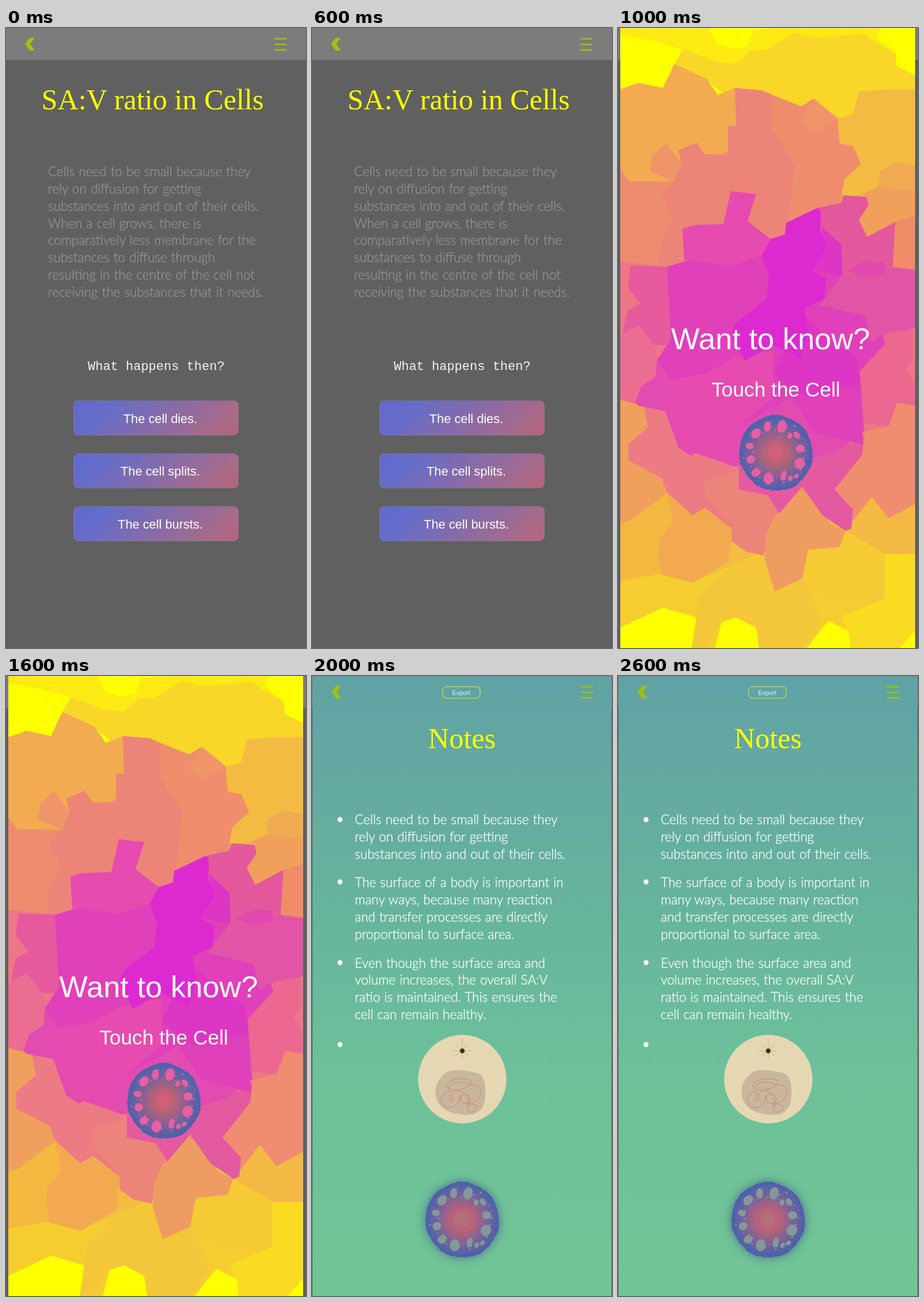
Animation of 521x1075 px, one loop 3 s. Source, as an HTML page:

```html
<!DOCTYPE html>
<html lang="en">
<head>
<meta charset="utf-8">
<title>Cells</title>
<style>
html, body { margin: 0; width: 100%; height: 100%; overflow: hidden; background: #606060; }
svg { display: block; width: 100vw; height: 100vh; }
.title { font: 50.3px "Liberation Serif", serif; fill: #ff0; text-anchor: middle; }
.body { font: 300 22.5px Lato, sans-serif; word-spacing: 1px; fill: currentColor; stroke: currentColor; stroke-width: .35; }
.mono { font: 22px "Liberation Mono", monospace; fill: #f4f4f4; }
.sans { font-family: "Liberation Sans", Arial, sans-serif; fill: #fff; text-anchor: middle; }
</style>
</head>
<body>
<svg viewBox="0 0 521 1075" preserveAspectRatio="none">
  <defs>
    <linearGradient id="btn" gradientUnits="userSpaceOnUse" x1="57" y1="-57" x2="230" y2="117">
      <stop offset="0" stop-color="#6069cc"/>
      <stop offset=".2" stop-color="#656cc9"/>
      <stop offset=".85" stop-color="#a96a88"/>
      <stop offset="1" stop-color="#b4647c"/>
    </linearGradient>
    <linearGradient id="sea" x2="0" y2="1">
      <stop offset="0" stop-color="#61a2a5"/>
      <stop offset=".3" stop-color="#65b09e"/>
      <stop offset=".65" stop-color="#6dc19a"/>
      <stop offset="1" stop-color="#72c595"/>
    </linearGradient>
    <radialGradient id="flesh" gradientUnits="userSpaceOnUse" cx="0" cy="0" r="65">
      <stop offset="0" stop-color="#cf5f6c"/>
      <stop offset=".3" stop-color="#b96277"/>
      <stop offset=".75" stop-color="#6962a0"/>
      <stop offset="1" stop-color="#4a61ae"/>
    </radialGradient>
    <filter id="glow" x="-40%" y="-40%" width="180%" height="180%">
      <feDropShadow dx="0" dy="0" stdDeviation="8.5" flood-color="#3c4d86" flood-opacity=".75"/>
    </filter>
    <clipPath id="card"><rect x="4" width="512" height="1075"/></clipPath>
    <g id="nav">
      <path d="M33 28L41 17H50L42 28L50 39H41Z"/>
      <path d="M466 17.5h21v2.6h-21zM466 27.2h21v2.6h-21zM466 36.7h21v2.6h-21z"/>
    </g>
    <g id="cell"></g>
  </defs>

  <g id="quiz">
    <rect width="521" height="1075" fill="#606060"/>
    <rect width="521" height="55.5" fill="#7c7c7c"/>
    <use href="#nav" fill="#9cc40c"/>
    <text class="title" x="254.5" y="141">SA:V ratio in Cells</text>
    <g id="intro" class="body" color="#949498"></g>
    <text class="mono" x="142" y="593">What happens then?</text>
    <g id="buttons"></g>
  </g>

  <g id="touch" clip-path="url(#card)">
    <rect x="4" width="512" height="1075" fill="#ff0"/>
    <!-- yellow top -->
    <path fill="#fcea12" d="M4 0H165L198 35L222 30L232 5L270 0H480L484 60L300 100L100 60L4 20Z"/>
    <path fill="#ff0" d="M4 12L60 22L112 37L98 62L78 104L40 95L4 106ZM157 0H236L225 32L200 36L172 28ZM455 0H516V82L484 66L482 44L450 18Z"/>
    <path fill="#f8d728" d="M98 62L113 37L172 59L205 62L230 40L258 38L305 9L345 17L428 10L442 22L482 44L484 66L516 82V160H340L192 120L154 90Z"/>
    <!-- warm middle -->
    <path fill="#ee8f6e" d="M4 200L203 106L318 137L340 125L380 158L516 250V830H4Z"/>
    <!-- amber -->
    <path fill="#f2ab50" d="M4 106L36 95L78 104L98 62L154 88L173 116L203 104L225 190L110 266H4Z"/>
    <path fill="#f4bb42" d="M381 157L408 150L418 110L470 106L516 106V260L450 300L388 290L385 200Z"/>
    <path fill="#f0ab52" d="M484 232L516 240V345L433 362L400 292L422 288L452 275L455 248Z"/>
    <path fill="#f0a05a" d="M452 275L516 283V336L482 336L433 362L418 330L434 292L424 290Z"/>
    <!-- salmon -->
    <path fill="#ec8478" d="M203 104L250 108L268 116L318 136L340 123L382 157V200L408 205L422 236L393 262L388 290L350 330L265 380L85 420L4 405V245L20 266H98L110 236L105 212L137 199L150 219H191V170L205 170Z"/>
    <path fill="#ef8d6d" d="M268 116L318 136L340 123L382 157V200L408 205L422 236L393 262L388 290L355 314L295 336L307 240L266 172Z"/>
    <path fill="#f0956a" d="M340 123L382 157L343 180L319 160ZM84 200L110 236L98 266L55 249L60 220Z"/>
    <path fill="#ef8c70" d="M4 245L20 266H98L75 290L95 330L75 370L70 412L4 405Z"/>
    <!-- pink sides -->
    <path fill="#ed7784" d="M4 405L85 414L110 600L60 700L4 645ZM477 400L516 418V800L430 760L410 560Z"/>
    <path fill="#e75a9e" d="M22 412L90 414L100 550H55L36 515L8 530L17 490L39 478L17 450Z"/>
    <path fill="#ec6d92" d="M8 530L36 515L60 545L80 600L35 625L28 655L4 640V535Z"/>
    <path fill="#e4589e" d="M346 312L388 303L392 290L432 293L435 308L418 333L433 362L482 336L477 415L516 420V520L440 540L350 500Z"/>
    <path fill="#f08c68" d="M482 336L516 326V418L477 414Z"/>
    <path fill="#ec6890" d="M420 595L460 548L464 530L512 522V575L500 590L516 620V655L485 650L470 690L424 685Z"/>
    <!-- lower bands -->
    <path fill="#f4bd42" d="M4 800L250 830L516 780V1075H4Z"/>
    <path fill="#f6cd30" d="M4 955L80 945L130 960L250 910L400 868L465 912H516V1075H4Z"/>
    <path fill="#f09f5c" d="M4 645L45 655L52 692L18 722L18 750L76 780L87 810L20 855L4 860Z"/>
    <path fill="#f08c70" d="M428 700L470 690L485 650L516 655V830L470 860L441 813L395 872L370 800L380 735Z"/>
    <path fill="#ec7b84" d="M50 655L105 640L210 730L225 800L197 868L151 832L129 845L85 805L76 780L18 750V722L52 692Z"/>
    <path fill="#f2a950" d="M85 805L129 845L151 832L197 868L192 925L130 962L66 945L75 850L20 855Z"/>
    <path fill="#f4b840" d="M85 808L96 858L68 890L75 946L4 958V860L20 855Z"/>
    <path fill="#ed847a" d="M150 785L215 765L275 800L315 792L350 830L340 850L270 850L253 915L222 908L197 890V865L152 815Z"/>
    <path fill="#ef9c62" d="M270 850L315 795L350 830L370 860L395 872L385 900L330 905L320 955L272 977L253 945L257 880Z"/>
    <path fill="#f5ca34" d="M395 872L441 813L470 860L516 830V912L463 912V990L410 1000L320 975V955L330 905L385 900Z"/>
    <path fill="#f4b844" d="M441 813L470 850L516 825V912H465L395 872Z"/>
    <!-- magenta core -->
    <path fill="#e24bb0" d="M92 440L380 420L460 530L464 548L420 595L428 700L380 735L340 750L200 760L182 753L140 730L128 742L105 728L82 664L35 655L30 648L40 622L65 605L68 575L92 540Z"/>
    <path fill="#e45aa0" d="M340 745L380 733L428 705L424 740L376 800L408 835L405 868L395 872L355 845L320 795L280 842L260 810L210 800V760Z"/>
    <path fill="#e040b9" d="M85 414L125 402L195 410L250 393L380 420L388 450L430 500L464 545L420 595L425 722L340 700L300 640L205 695L150 600L90 610L68 575L92 540Z"/>
    <path fill="#e64bb0" d="M112 348L130 342L183 340L196 283L240 288L225 335L265 366L250 393L195 413L125 402L115 404ZM90 610L150 600L205 570L270 560V640L205 695L182 753L128 735L82 664Z"/>
    <path fill="#e254a6" d="M388 430L477 415L516 420V520L464 528L440 545L430 500L350 480Z"/>
    <path fill="#dd36c4" d="M355 345L388 376L390 430L340 420ZM320 495L370 545L415 570L420 620L325 640L270 600Z"/>
    <path fill="#dd2ad0" d="M265 366L290 358L292 338L346 312L352 316L352 355L364 378L338 420L362 435L358 470L324 485L330 530L318 573L268 550L220 577L196 530L206 510L258 470L262 430L250 393Z"/>
    <path fill="#e248ad" d="M398 420L430 404L462 407L464 425L430 432Z"/>
    <!-- yellow floor -->
    <path fill="#f4c63a" d="M140 990L197 930L253 915L272 977L320 955L355 1030L320 1075H240L235 1040L180 1025L150 1075H128Z"/>
    <path fill="#f9dc22" d="M463 912H516V1075H405L390 1020L463 990Z"/>
    <path fill="#ff0" d="M4 1040L78 1005L136 1022L128 1075H4ZM168 1075L180 1030L205 1022L240 1040L245 1075ZM328 1075L365 1028L400 1045L404 1075ZM490 1075L516 1045V1075Z"/>
    <text class="sans" x="265" y="557" font-size="52.5">Want to know?</text>
    <text class="sans" x="274" y="639" font-size="35.3">Touch the Cell</text>
    <use href="#cell" x="274.5" y="737" color="#e85fa2"/>
  </g>

  <g id="notes">
    <rect x="1" width="519" height="1075" fill="url(#sea)"/>
    <use href="#nav" x="1" fill="#9cc40c"/>
    <rect x="226.7" y="18.5" width="65.3" height="20" rx="7" fill="none" stroke="#dcea24" stroke-width="1.1"/>
    <text class="sans" x="259.2" y="32.5" font-size="11" opacity=".85">Export</text>
    <text class="title" x="260.5" y="125">Notes</text>
    <g id="points" class="body" color="#fff"></g>
    <circle cx="261" cy="699" r="76.7" fill="#e6d7b3"/>
    <path fill="#c8b79c" d="M238 685C252 681 277 686 289 689C300 694 302 711 301 728C300 744 295 755 280 760C262 763 238 759 225 747C212 735 212 713 219 703C225 695 229 688 238 685Z"/>
    <path fill="none" stroke="#cc7570" stroke-width=".8" d="M236 715C228 699 262 695 276 701C284 711 247 724 236 715C246 697 270 706 279 710C300 707 293 729 288 735C270 747 250 740 258 728C270 717 282 736 270 741C262 747 290 736 286 750C279 762 265 754 271 746C277 735 263 712 249 721C240 728 247 737 242 738C233 735 247 719 238 720C223 723 220 739 232 747C250 753 258 734 259 727"/>
    <path stroke="#b5a684" stroke-width=".7" d="M261 645V629M261 655V664M256 650H243M266 650H275M257 646L250 639M265 646L271 638M257 654L249 658M265 654L271 658"/>
    <circle cx="261" cy="650" r="4.2" fill="#43340f"/>
    <g filter="url(#glow)"><use href="#cell" x="261" y="943" color="#84989a"/></g>
  </g>
</svg>
<script>
const el = id => document.getElementById(id);
const LEAD = 29.85;

const lines = (rows, x, y) =>
  rows.map((s, i) => `<text x="${x}" y="${y + i * LEAD}">${s}</text>`).join("");

const need = [
  "Cells need to be small because they",
  "rely on diffusion for getting",
  "substances into and out of their cells."
];

el("intro").innerHTML = lines([
  ...need,
  "When a cell grows, there is",
  "comparatively less membrane for the",
  "substances to diffuse through",
  "resulting in the centre of the cell not",
  "receiving the substances that it needs."
], 73, 257);

el("buttons").innerHTML = ["dies", "splits", "bursts"].map((verb, i) => `
  <g transform="translate(117 ${646 + i * 91.6})">
    <rect x=".5" y=".5" width="286" height="59.5" rx="8" fill="url(#btn)" stroke="#9580a8" stroke-opacity=".6"/>
    <text class="sans" x="151" y="38.7" font-size="21.8">The cell ${verb}.</text>
  </g>`).join("");

const notes = [
  [257, 249, need],
  [366, 357, [
    "The surface of a body is important in",
    "many ways, because many reaction",
    "and transfer processes are directly",
    "proportional to surface area."
  ]],
  [505.5, 497, [
    "Even though the surface area and",
    "volume increases, the overall SA:V",
    "ratio is maintained. This ensures the",
    "cell can remain healthy."
  ]],
  [0, 639, []]
];
el("points").innerHTML = notes.map(([y, dot, rows]) =>
  `<circle cx="48.7" cy="${dot}" r="4.2"/>` + lines(rows, 74.3, y)).join("");

// Cell section: rough rim, a ring of vessels, speckled core
let seed = 11;
const rand = () => (seed = seed * 16807 % 2147483647) / 2147483647;
const polar = (a, r) => [Math.cos(a) * r, Math.sin(a) * r];
const hole = (x, y, rx, ry, turn = 0) =>
  `<ellipse rx="${rx}" ry="${ry}" transform="translate(${x} ${y}) rotate(${turn})"/>`;

function drawCell() {
  const rim = Array.from({ length: 120 }, (_, i) => {
    const a = i / 120 * Math.PI * 2;
    const r = 63.8 + Math.sin(a * 2 - 1) + .7 * Math.sin(a * 7) + rand() * 1.4;
    return polar(a, r).map(v => v.toFixed(1)).join();
  });
  const vessels = [
    [-15, -46, 6, 9, 5], [10, -46, 8, 11, 12], [-35, -34, 7.5, 9.5, 40],
    [36, -31, 5, 7, -35], [42, -8, 8, 7, 0], [41, 18, 9, 10, 25],
    [13, 39, 5, 9, 15], [-13, 44, 8.5, 10.5, 8], [-35, 34, 8, 7, -30],
    [-44, 11, 7.5, 7, -20], [-46, -12, 7, 5.5, 15], [24, -30, 4, 5.5, 20],
    [25, 44, 4, 5, 30], [35, 40, 3.5, 5, 50]
  ].map(v => hole(...v));
  const flecks = Array.from({ length: 46 }, () => {
    const [x, y] = polar(rand() * 6.283, 39 + rand() * 18);
    const r = .5 + rand() * 1.3;
    return hole(x, y, r, r);
  });
  const core = Array.from({ length: 100 }, (_, i) => {
    const [x, y] = polar(i * 2.4, 1.35 * Math.sqrt(i));
    return hole(x - 1, y - 1, .5 + rand() * .45, .5 + rand() * .45);
  });
  el("cell").innerHTML =
    `<polygon points="${rim.join(" ")}" fill="url(#flesh)"/>` +
    `<g fill="currentColor">${[...vessels, ...flecks, ...core].join("")}</g>`;
}
drawCell();

const start = performance.now();
function draw(now) {
  const step = Math.floor(Math.max(0, now - start) / 1000) % 3;
  el("touch").style.display = step === 1 ? "" : "none";
  el("notes").style.display = step === 2 ? "" : "none";
  requestAnimationFrame(draw);
}
draw(start);
</script>
</body>
</html>
```
